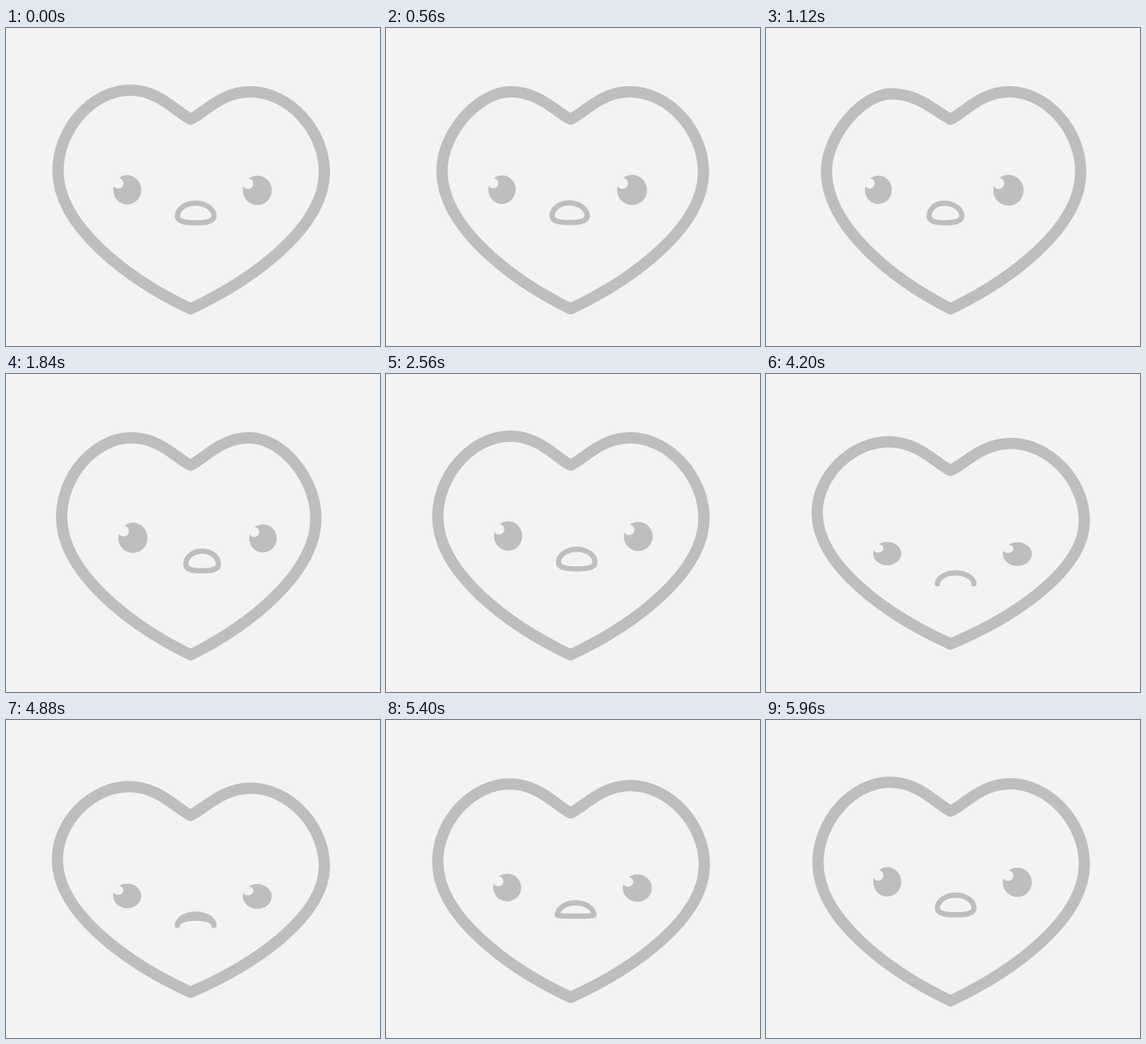
These frames come from a looping animation (464 px wide and 394 px high, 6 s). An HTML page:

```html
<!DOCTYPE html>
<html lang="en">
<head>
<meta charset="utf-8">
<title>Heart face</title>
<style>
  html, body { margin: 0; width: 100%; height: 100%; overflow: hidden; background: #f3f3f3; }
  svg { display: block; width: 464px; height: 394px; }
  .line { fill: none; stroke: #bebebe; stroke-linejoin: round; }
  .eye { fill: #bebebe; }
  .glint { fill: #f3f3f3; }
</style>
</head>
<body>
<svg viewBox="0 0 464 394">
  <path id="heart" class="line" stroke-width="14"/>
  <g id="leftEye"><ellipse class="eye"/><ellipse class="glint"/></g>
  <g id="rightEye"><ellipse class="eye"/><ellipse class="glint"/></g>
  <path id="mouth" class="line" stroke-width="6.5"/>
</svg>
<script>
const LOOP = 6000;
const byId = id => document.getElementById(id);

// Smooth 0 to 1 between two times
function ramp(ms, from, to) {
  const u = Math.min(1, Math.max(0, (ms - from) / (to - from)));
  return u * u * (3 - 2 * u);
}

// -1 looks left, 1 looks right
const lookAt = ms => 2 * ramp(ms, 1200, 1780) - ramp(ms, 160, 840) - ramp(ms, 2080, 2700);
const sadAt = ms => ramp(ms, 3640, 4200) - ramp(ms, 4420, LOOP);

// Half of the outline: notch, over one lobe, down to the tip
function lobe(notch, top, side, tip, round) {
  const [nx, ny] = notch, [px, py] = top, [sx, sy] = side, [tx, ty] = tip;
  return [
    notch, [nx + .24 * (px - nx), ny - .25 * (ny - py)], [px + .48 * (nx - px), py], top,
    [px + round * (sx - px), py], [sx, sy - round * (sy - py)], side,
    [sx, sy + .4 * (ty - sy)], [tx - .48 * (tx - sx), ty - .22 * (ty - sy)], tip
  ];
}

function drawHeart(look, sad) {
  const turn = look * look;
  const notch = [229, 113 + 6.5 * sad], tip = [229, 348 - 13.5 * sad];
  const leftTop = [154 - 2 * sad + 1.5 * turn, 77 + 7 * sad + 3.2 * turn - 1.2 * look];
  const rightTop = [303 + sad - turn, 79 + 7 * sad];
  const leftSide = [64.5 - sad + 7.5 * turn - 3 * look, 177 - 5 * sad];
  const rightSide = [395 - 7.5 * turn - 3 * look, 178.5 + 3.5 * sad];
  // the lobe on the side looked at flattens
  const a = lobe(notch, leftTop, leftSide, tip, .52 - .07 * Math.max(0, -look));
  const b = lobe(notch, rightTop, rightSide, tip, .52 - .03 * Math.max(0, look));
  const [start, ...rest] = [...a, ...b.reverse().slice(1)];
  byId('heart').setAttribute('d', `M${start}C${rest.join(' ')}Z`);
}

function setOval(el, cx, cy, rx, ry) {
  for (const [name, value] of Object.entries({ cx, cy, rx, ry })) el.setAttribute(name, value);
}

function drawEye(id, x, y, w, h) {
  const [ball, glint] = byId(id).children;
  setOval(ball, x, y, w, h);
  setOval(glint, x - .64 * w, y - .45 * h, .37 * w, .36 * h);
}

function drawMouth(x, peak, half, side, top, bottom, full) {
  const l = x - half, r = x + half;
  const arc = (from, to, y, k) => {
    const c = side + k * (y - side);
    return `C${from},${c} ${peak + .54 * (from - peak)},${y} ${peak},${y}` +
      `C${peak + .54 * (to - peak)},${y} ${to},${c} ${to},${side}`;
  };
  byId('mouth').setAttribute('d', `M${l},${side}${arc(l, r, top, .56)}${arc(r, l, bottom, full)}Z`);
}

function draw(ms) {
  const look = lookAt(ms), sad = sadAt(ms), turn = look * look;
  const dx = 9 * look - 2 * turn, dy = 1.25 * (look + turn);
  const eyeY = 200.5 + dy + 22 * sad, eyeH = 18.2 - 3.6 * sad;

  drawHeart(look, sad);
  drawEye('leftEye', 150.4 + dx, eyeY, 17.4 + .7 * look, eyeH + .6 * look);
  drawEye('rightEye', 311.8 + dx, eyeY + .6, 18 - .9 * look, eyeH - .8 * look);

  const x = 235.3 + 1.15 * dx;
  drawMouth(x, x + look - turn, 22.7 - 2.4 * turn,
    233 + dy + 27 * sad, 217 + dy + 29.6 * sad, 241.3 + dy + 5.3 * sad, .85 - .29 * sad);
}

const start = performance.now();
function tick() {
  draw((performance.now() - start) % LOOP);
  requestAnimationFrame(tick);
}
tick();
</script>
</body>
</html>
```
